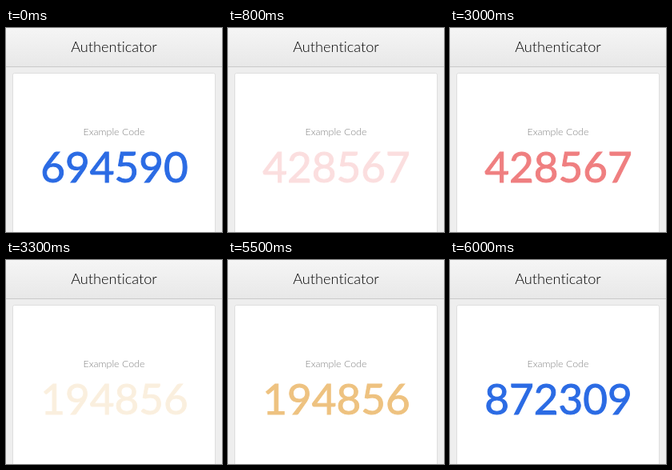
Recreate the animation shown at these times as an HTML page. Size 270 by 255 pixels, loop 8000 ms.

```html
<!DOCTYPE html>
<html lang="en">
<head>
<meta charset="utf-8">
<title>Authenticator</title>
<style>
  html, body { margin: 0; width: 100%; height: 100%; overflow: hidden; background: #eee; }
  svg {
    display: block; width: 270px; height: 255px;
    font-family: Lato, "Open Sans", sans-serif; font-weight: 300;
    font-variant-ligatures: none; text-anchor: middle;
  }
  #code { font-weight: 400; stroke-width: 1; }
</style>
</head>
<body>
<svg viewBox="0 0 270 255">
  <defs>
    <linearGradient id="bar" x2="0" y2="1">
      <stop stop-color="#f5f5f5"/>
      <stop offset="1" stop-color="#e8e8e8"/>
    </linearGradient>
  </defs>
  <rect width="270" height="48" fill="url(#bar)"/>
  <rect y="48" width="270" height="1" fill="#cacaca"/>
  <rect x="8.5" y="56.5" width="253" height="210" rx="2" fill="#fff" stroke="#dedede"/>
  <text x="135" y="30" font-size="18.2">Authenticator</text>
  <text x="135" y="134" font-size="12.4" fill="#808080">Example Code</text>
  <text id="code" x="135.5" y="193" font-size="53"></text>
</svg>
<script>
  const LOOP = 8000, PERIOD = 2500, LEAD = 500, STEP = 100;
  const codes = [
    ["694590", "#2b6be4"],
    ["428567", "#e62b2d"],
    ["194856", "#e39a2c"],
    ["872309", "#2b6be4"]
  ];
  // Opacity per step: the old code fades out, then the new one fades in.
  const fade = [0.6, 0.14, 0.02, 0.15, 0.64];
  const SWAP = 3;
  const label = document.getElementById("code");

  function draw(now) {
    const t = now % LOOP - LEAD;
    const turn = Math.floor(t / PERIOD);
    const step = Math.floor((t - turn * PERIOD) / STEP);
    const shown = turn < 0 ? 0 : turn + (step >= SWAP ? 1 : 0);
    const [digits, color] = codes[shown];
    label.textContent = digits;
    label.setAttribute("fill", color);
    label.setAttribute("stroke", color);
    label.setAttribute("opacity", turn < 0 ? 1 : fade[step] ?? 1);
  }

  const start = performance.now();
  function tick() {
    draw(performance.now() - start);
    requestAnimationFrame(tick);
  }
  tick();
</script>
</body>
</html>
```
